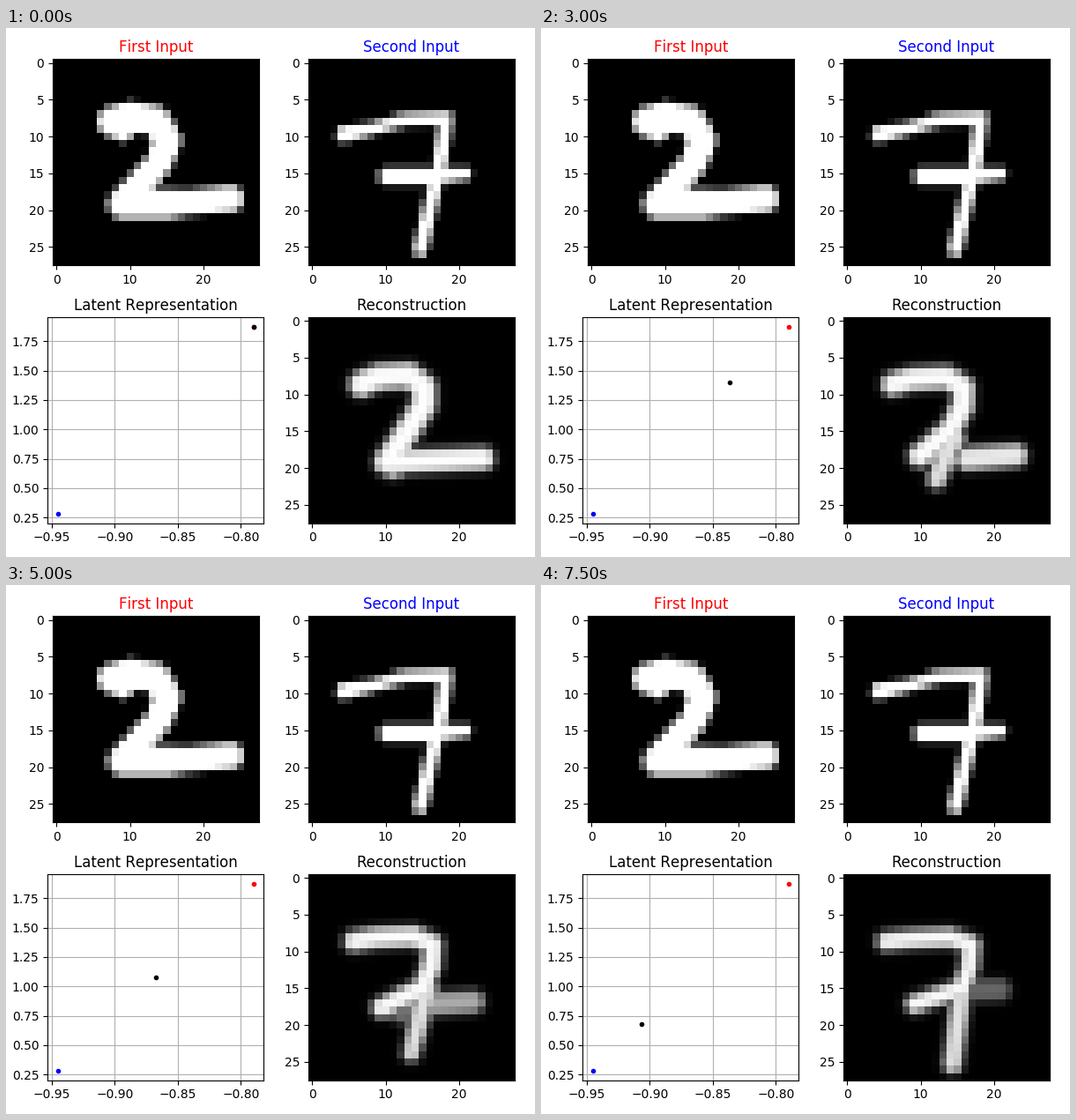
Recreate the animation shown at these times as a matplotlib script. Size 600x600 px, loop 8 s.

```python
import numpy as np
import matplotlib.pyplot as plt
from matplotlib.animation import FuncAnimation

SIZE, N, FRAMES, STEPS = 600, 28, 16, 20
SIDE, COLS, ROWS = 233.8, (53.0, 343.0), (35.4, 327.9)
START, END = np.array([-0.7895, 1.877]), np.array([-0.9455, 0.280])
YY, XX = np.mgrid[0:N, 0:N].astype(float)

plt.rcParams.update({"font.family": "DejaVu Sans", "text.kerning_factor": 6})


def edge_distance(points):
    """Signed distance of each cell to a polyline of (x, y, radius) points."""
    best = np.full((N, N), 99.0)
    for (x0, y0, r0), (x1, y1, r1) in zip(points, points[1:]):
        dx, dy = x1 - x0, y1 - y0
        u = ((XX - x0) * dx + (YY - y0) * dy) / max(dx * dx + dy * dy, 1e-9)
        u = np.clip(u, 0, 1)
        d = np.hypot(XX - x0 - u * dx, YY - y0 - u * dy)
        best = np.minimum(best, d - r0 - u * (r1 - r0))
    return best


def crisp(*strokes):
    return np.max([np.clip(0.5 - edge_distance(s), 0, 1) for s in strokes], axis=0)


def soft(points, r0, r1, gain=1.0):
    radii = np.linspace(r0, r1, len(points))
    return gain / (1 + np.exp(edge_distance(np.c_[points, radii]) / 0.3))


def lerp(a, b, u):
    return np.asarray(a) + (np.asarray(b) - np.asarray(a)) * u


def smooth(u):
    u = np.clip(u, 0, 1)
    return u * u * (3 - 2 * u)


two = crisp(
    [(9, 9.3, 1.4), (7.6, 8, 2), (10, 7.4, 2.1), (13.5, 7.8, 1.9),
     (15, 10.5, 2), (13.9, 13.6, 1.8), (9.4, 18.8, 2)],
    [(9, 19.2, 2), (15, 19.2, 2), (18, 19, 1.7), (23.6, 18.5, 1.8)],
)
seven = crisp(
    [(4.4, 9.7, 1.1), (8, 9, 0.8), (12.5, 7.75, 0.85), (18.2, 7.6, 0.9)],
    [(18.2, 7.6, 0.9), (17.2, 14.5, 0.95), (14.7, 25.3, 0.95)],
    [(10.2, 15.45, 1.15), (16, 15.45, 1.15), (20.8, 15.1, 0.8)],
)

# tip, bar, crown, shoulder, bend, elbow, foot
BODY_TWO = [(6.7, 8.6), (9, 7.6), (13.2, 7.4), (15.2, 9), (15.2, 11.3),
            (13.2, 14.6), (10.2, 19)]
BODY_SEVEN = [(5.3, 8.6), (8.5, 8.3), (14, 8.1), (16.8, 9), (16.6, 12),
              (15.6, 15), (9.2, 17.1)]


def decode(i):
    """The 2 turns into a 7: the foot lifts, a tail grows, the base fades."""
    t = i / (FRAMES - 1)
    e, early = smooth(t), smooth(t / 0.6)
    late, mid = e * e, np.sin(np.pi * e) ** 2

    body = lerp(BODY_TWO, BODY_SEVEN, e)
    tail = [lerp((10.8, 18.5), (15.6, 15), early), lerp((11, 19.5), (14.3, 25.2), e)]
    base = [lerp((10, 19.2), (15.5, 15.3), late) + (7 * mid, 0),
            lerp((23.2, 18.7), (20.7, 15.2), late)]
    knot = [(12.3, 17.8)] * 2
    r = lerp(1.65, 1.2, e)
    return np.max([
        soft(body, r, r),
        soft(tail, lerp(1.8, 1.25, e), lerp(1.8, 1.25, e) - 0.5 * mid, 0.9),
        soft(base, 1.55, 1.5, lerp(1, 0.4, late)),
        soft(knot, 2, 2, 0.85 * mid),
    ], axis=0)


fig = plt.figure(figsize=(SIZE / 100, SIZE / 100), dpi=100, facecolor="white")


def panel(x, y, w, title, color="black"):
    ax = fig.add_axes([x / SIZE, 1 - (y + SIDE) / SIZE, w / SIZE, SIDE / SIZE])
    ax.set_title(title, color=color, fontsize=12)
    return ax


def image_panel(col, row, title, data, color="black"):
    ax = panel(COLS[col], ROWS[row], SIDE, title, color)
    im = ax.imshow(data, cmap="gray", vmin=0, vmax=1, interpolation="nearest")
    ax.set_xticks(range(0, N, 10))
    ax.set_yticks(range(0, N, 5))
    return im


image_panel(0, 0, "First Input", two, "red")
image_panel(1, 0, "Second Input", seven, "blue")
recon = image_panel(1, 1, "Reconstruction", decode(0))

latent = panel(47.4, ROWS[1], 245, "Latent Representation")
latent.grid(True, color="#b0b0b0", linewidth=0.8)
latent.plot(*START, ".", color="red")
latent.plot(*END, ".", color="blue")
dot, = latent.plot(*START, ".", color="black")
pad = 0.05 * (START - END)
latent.set_xticks(np.arange(-0.95, -0.79, 0.05))
latent.set_yticks(np.arange(0.25, 1.8, 0.25))
latent.set_xlim(END[0] - pad[0], START[0] + pad[0])
latent.set_ylim(END[1] - pad[1], START[1] + pad[1])


def update(i):
    x, y = lerp(START, END, i / STEPS)
    dot.set_data([x], [y])
    recon.set_data(decode(i))
    return dot, recon


anim = FuncAnimation(fig, update, frames=FRAMES, interval=500, repeat=True,
                     repeat_delay=0, blit=False)
plt.show()
```
